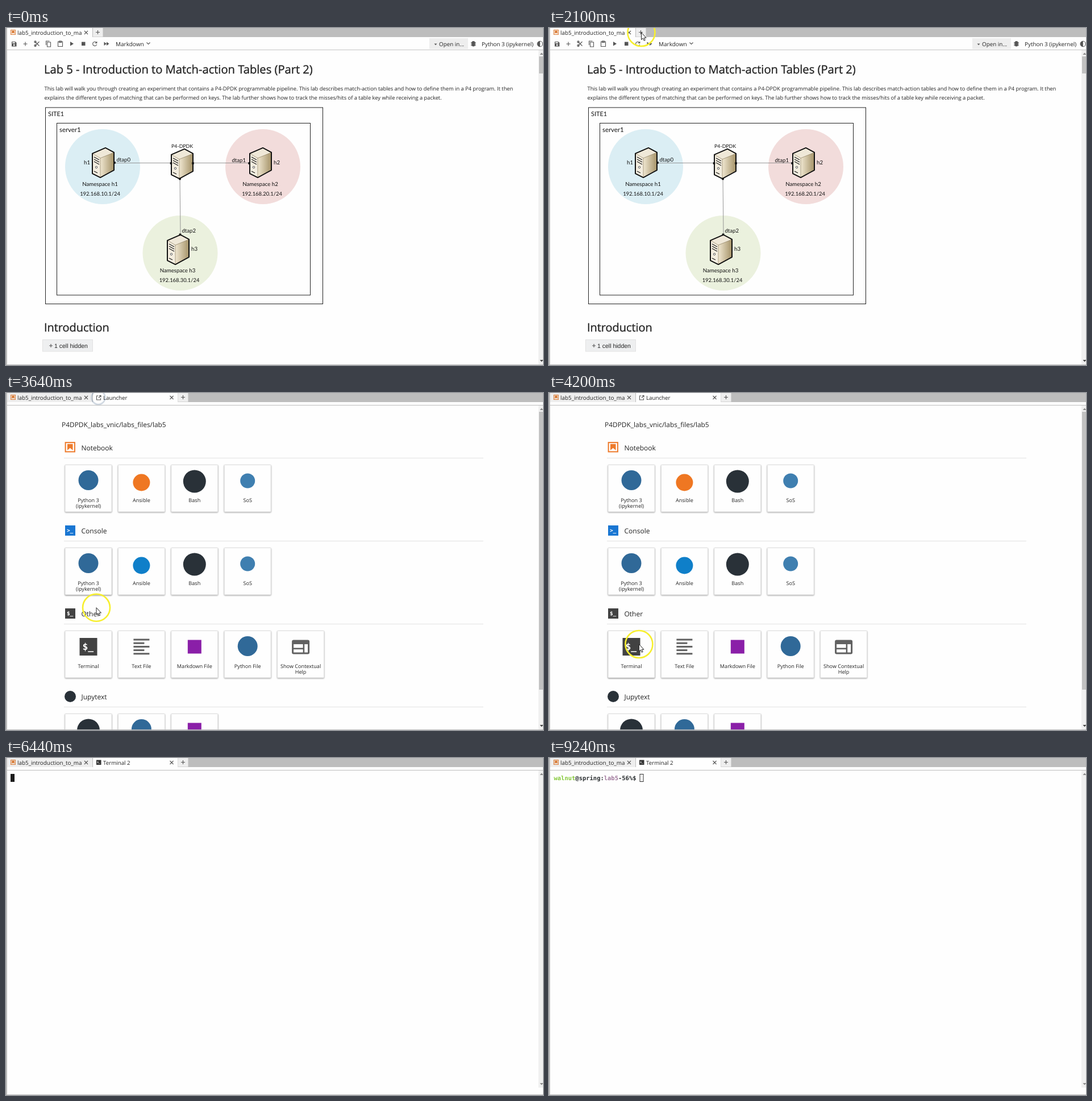
These frames come from a looping animation (945 by 593 pixels, 9310 ms). An HTML page:

```html
<!DOCTYPE html>
<html lang="en">
<head>
<meta charset="utf-8">
<title>Lab 5 walkthrough</title>
<style>
  html, body { margin: 0; width: 100%; height: 100%; overflow: hidden; background: #fefefe; }
  svg { display: block; width: 945px; height: 593px; }
  text { font-family: "Open Sans", "Noto Sans", sans-serif; fill: #242424; text-rendering: geometricPrecision; white-space: pre; }
  .lato { font-family: Lato, sans-serif; fill: #111; }
  .arial { font-family: "Liberation Sans", Arial, sans-serif; }
  .mono { font-family: "DejaVu Sans Mono", monospace; font-weight: 700; fill: #2b2f31; }
  .head { stroke: #242424; stroke-width: .35px; }
  .mid { text-anchor: middle; }
  .icon { fill: #555; }
  .line { fill: none; stroke: #555; stroke-width: 1.1; }
  .card { fill: #fefefe; stroke: #dedede; filter: drop-shadow(0 1px 1px rgba(0, 0, 0, .36)); }
  .card.hover { filter: drop-shadow(0 1px 1.2px rgba(0, 0, 0, .48)); }
  .card.focus { stroke: #3182ad; filter: drop-shadow(0 1px 2.5px rgba(0, 0, 0, .5)); }
</style>
</head>
<body>
<svg id="stage" viewBox="0 0 945 593" xmlns="http://www.w3.org/2000/svg"></svg>
<script>
const LOOP = 9310, STEP = 140;
const stage = document.getElementById('stage');

const text = (x, y, s, size, attrs = '') => `<text x="${x}" y="${y}" font-size="${size}" ${attrs}>${s}</text>`;
const rect = (x, y, w, h, fill, attrs = '') => `<rect x="${x}" y="${y}" width="${w}" height="${h}" fill="${fill}" ${attrs}/>`;
const disc = (x, y, r, fill, attrs = '') => `<circle cx="${x}" cy="${y}" r="${r}" fill="${fill}" ${attrs}/>`;
const path = (d, attrs = 'class="line"') => `<path d="${d}" ${attrs}/>`;
const at = (x, y, s) => `<g transform="translate(${x} ${y})">${s}</g>`;

// Shared window parts
const cross = x => path(`M${x - 3} 5l6 6m0-6l-6 6`);
const plus = (x, y, r) => path(`M${x - r} ${y}h${2 * r}M${x} ${y - r}v${2 * r}`);

const bookmark = (x, y, s, color) =>
  rect(x + s * .06, y + s * .06, s * .88, s * .88, 'none', `stroke="${color}" stroke-width="${s * .11}"`) +
  path(`M${x + s * .24} ${y + s * .2}h${s * .52}v${s * .6}l${-s * .26} ${-s * .22}l${-s * .26} ${s * .22}z`, `fill="${color}"`);

const prompt = (x, y, s, sign, color) => rect(x, y, s, s, color) +
  text(x + s * .16, y + s * .67, sign + '_', s * .53, 'class="mono" style="fill:#fff"');

const popOut = (x, y) => path(`M${x + 3} ${y + 1}h-3v7h7v-3M${x + 3.5} ${y + 4.5}l4-4m-3 0h3v3`);

function tabs(label, icon) {
  const end = label ? 303 : 153;
  return rect(0, 0, 945, 16, '#bdbdbd') +
    rect(2, 0, 150, 16, label ? '#eee' : '#fefefe') +
    (label ? rect(153, 0, 149.5, 16, '#fefefe') : '') +
    rect(end, 0, 17.5, 15.5, '#eee') +
    bookmark(8, 3, 9, '#d9772f') + text(20, 11.6, 'lab5_introduction_to_ma', 9.85) + cross(141) +
    (label ? icon + text(171, 11.6, label, 9.75) + cross(291.5) + rect(0, 21, 945, 1, '#bdbdbd') : '') +
    plus(end + 8.5, 7.5, 3.5);
}

const frame = rect(0, 0, 2, 593, '#bdbdbd') + rect(0, 592, 945, 1, '#bdbdbd');

function scrollbar(top, bottom, thumbY, thumbH) {
  return rect(937, top, 8, bottom - top, '#f0f0f0') +
    (thumbH ? rect(938, thumbY, 7, thumbH, '#c1c1c1') : '') +
    path(`M939.5 ${top + 8}l3-3.5l3 3.5z`, 'fill="#888"') +
    path(`M939.5 ${bottom - 8}l3 3.5l3-3.5z`, `fill="${thumbH ? '#444' : '#888'}"`);
}

// Notebook
const toolbar =
  path('M10 24h6.5l2 2v6.5h-8.5z', 'class="icon"') + rect(11.3, 25, 4.5, 2, '#fff') + disc(14.2, 30, 1.4, '#fff') +
  plus(34, 28, 3.5) +
  path('M51 24l7.5 7.5M51 31.5l7.5-7.5', 'class="line" stroke-width="1.4"') +
  disc(51.5, 24.5, 1.6, 'none', 'class="line"') + disc(51.5, 31, 1.6, 'none', 'class="line"') +
  path('M70.5 30v-7h6M72.5 25h6v8h-6z') +
  path('M91.5 24h8v8.5h-8zM93.5 23v2.5h4v-2.5z') +
  path('M113 24l6 3.8l-6 3.8zM133 24.5h6.5v6.5h-6.5z', 'class="icon"') +
  path('M159 25.5a3.6 3.6 0 1 0 .7 3.4M159.8 23.8v2.6h-2.8') +
  path('M172.5 24.5l4.5 3.2l-4.5 3.2zM177 24.5l4.5 3.2l-4.5 3.2z', 'class="icon"') +
  text(193, 31.5, 'Markdown', 10) + path('M247.5 25.5l3 3l3-3') +
  rect(745, 18, 68, 19, '#eee') + path('M753.5 27.5h5l-2.5 2.7z', 'class="icon"') +
  text(762, 31.5, 'Open in...', 9.85) +
  path('M819.5 26a3 3 0 0 1 6 0v3.5a3 3 0 0 1-6 0zM818 25h9v1h-9zM818 27.6h9v1h-9zM818 30.2h9v1h-9z', 'class="icon"') +
  text(837, 31.5, 'Python 3 (ipykernel)', 9.9) +
  disc(939.8, 28, 4.8, '#fefefe', 'stroke="#555"') + path('M939.8 23.2a4.8 4.8 0 0 0 0 9.6z', 'class="icon"') +
  rect(0, 38, 945, 1, '#c4c4c4');

const server = `
  <path d="M0 10L23 0L38 8V39L14 52L0 45Z" fill="#e9dfc9" stroke="#111" stroke-width="2" stroke-linejoin="round"/>
  <path d="M1 10.500L23 1L37 8.500L14 18Z" fill="#efe8d8"/>
  <path d="M14 18L37 8.500V38.500L14 51Z" fill="url(#tan)"/>
  <path d="M1 10.500L14 18V51L1 44.500Z" fill="#f3eddf"/>
  <path d="M14 18V51M1 10.500L14 18L37 8.500" fill="none" stroke="#8d7f60" stroke-width=".7"/>
  <path d="M3 16l9 5M3 20l9 5M3 24l9 5M3 41l6 3" stroke="#222" stroke-width="1.300"/>
  <circle cx="7" cy="34" r="1.700" fill="#fff" stroke="#333" stroke-width=".8"/>`;

const host = (x, y, n, color, label) =>
  disc(x, y, 66, color) +
  text(...label, 'h' + n, 9.7, 'class="lato"') +
  text(x - 4.5, y + 34, 'Namespace h' + n, 9.7, 'class="lato mid"') +
  text(x - 1.5 - (n === 1 ? 3 : 0), y + 51, `192.168.${n}0.1/24`, 9.4, 'class="lato mid"');

const port = (x, y) => rect(x - 1.8, y - 1.8, 3.6, 3.6, '#111');

const diagram =
  rect(69.5, 140, 488, 345.5, '#fefefe', 'stroke="#222"') +
  rect(89.5, 167.5, 446, 302.5, 'none', 'stroke="#222"') +
  host(170, 244, 1, '#dbeef4', [137, 239.5]) +
  host(452, 244, 2, '#f2dcdb', [471, 239.5]) +
  host(306.5, 396, 3, '#ebf1de', [326, 391.5]) +
  path('M191 237.500H290M329 237.500H428M306 265L307 363', 'fill="none" stroke="#8c8c8c" stroke-width=".9"') +
  [[152, 211], [291, 213], [429, 211], [284, 364]].map(([x, y]) => at(x, y, server)).join('') +
  [[191, 237], [290.5, 238], [329, 238], [428, 238], [306, 265.5], [306.5, 363.5]].map(p => port(...p)).join('') +
  [[74, 154.5, 'SITE1', 10.9], [94, 183, 'server1', 11.4], [291, 211, 'P4-DPDK', 8.8],
   [194.5, 235, 'dtap0', 9.6], [397.5, 236, 'dtap1', 9.6], [309.5, 360, 'dtap2', 9.6]]
    .map(t => text(...t, 'class="lato"')).join('');

const notebook = tabs() + toolbar +
  text(67, 80, 'Lab 5 - Introduction to Match-action Tables (Part 2)', 20.15, 'class="head"') +
  text(67.5, 110, 'This lab will walk you through creating an experiment that contains a P4-DPDK programmable pipeline. This lab describes match-action tables and how to define them in a P4 program. It then', 9.34) +
  text(67.5, 125.5, 'explains the different types of matching that can be performed on keys. The lab further shows how to track the misses/hits of a table key while receiving a packet.', 9.34) +
  diagram +
  text(67, 534, 'Introduction', 19.9, 'class="head"') +
  rect(64.5, 548.5, 88, 20.5, '#eeeff0', 'stroke="#e2e2e2"') + plus(79, 559, 3) +
  text(85, 563, '1 cell hidden', 10.5, 'class="arial"') +
  scrollbar(39, 592, 50, 30) + frame;

// Launcher
const art = {
  python: disc(41, 27, 17.5, '#306998'),
  orange: disc(41, 31, 15, '#ef7722'),
  blue: disc(41, 31, 15, '#0f7fc9'),
  bash: disc(41, 29, 20, '#293138'),
  sos: disc(41, 28, 13, '#3f7fb0'),
  terminal: prompt(25.5, 12.5, 31, '$', '#424242'),
  lines: [28, 19, 28, 19, 28].map((w, i) => rect(27, 14 + i * 6.2, w, 3, '#616161')).join(''),
  markdown: rect(29, 16, 24, 24, '#8a1fa8'),
  help: rect(27, 17.5, 28, 22, 'none', 'stroke="#616161" stroke-width="3" rx="1.500"') +
    rect(27, 17, 28, 6.5, '#616161') + rect(45, 22, 2.6, 18, '#616161') + rect(27, 30, 19, 2.6, '#616161')
};

const kernels = ansible => [['Python 3|(ipykernel)', 'python'], ['Ansible', ansible], ['Bash', 'bash'], ['SoS', 'sos']];
const sections = [
  ['Notebook', bookmark(103.5, 86, 18.5, '#ee7b2c'), kernels('orange')],
  ['Console', prompt(104, 87, 18, '&gt;', '#1976d2'), kernels('blue')],
  ['Other', prompt(104, 87, 18, '$', '#424242'),
    [['Terminal', 'terminal'], ['Text File', 'lines'], ['Markdown File', 'markdown'], ['Python File', 'python'], ['Show Contextual|Help', 'help']]],
  ['Jupytext', disc(113, 96, 10, '#293138'), [['', 'bash'], ['', 'python'], ['', 'markdown']]]
];

const card = ([label, icon], col, row) => at(104 + col * 93.4, 126.5,
  `<rect class="card" id="card${row}${col}" width="82" height="82.500" rx="1"/>` + art[icon] +
  label.split('|').map((s, i) => text(41, 65 + i * 10.5, s, 9.1, 'class="mid"')).join(''));

const launcher = tabs('Launcher', popOut(159.5, 4)) +
  text(98, 60, 'P4DPDK_labs_vnic/labs_files/lab5', 11.9) +
  sections.map(([title, icon, cards], row) => at(0, row * 146,
    icon + text(132.5, 100.5, title, 12) + rect(102, 114, 738, 1, '#e2e2e2') +
    cards.map((c, col) => card(c, col, row)).join(''))).join('') +
  scrollbar(22, 592, 33, 489) + frame;

// Terminal
const terminal = tabs('Terminal 2', prompt(159, 3.5, 8.5, '$', '#333')) +
  scrollbar(22, 580) + frame +
  '<g id="shell">' + text(8.5, 39, '<tspan fill="#86c93a">walnut</tspan>@spring:<tspan fill="#a0789c">lab5</tspan>-56%$', 10.47, 'class="mono"') + '</g>' +
  rect(8, 28, 7, 14, '#1c1c1c', 'id="block"') +
  rect(160, 28.5, 6, 13, 'none', 'id="hollow" stroke="#333"');

stage.innerHTML =
  '<defs><linearGradient id="tan"><stop stop-color="#efe6d0"/><stop offset="1" stop-color="#a8966c"/></linearGradient></defs>' +
  `<g id="notebook">${notebook}</g><g id="launcher">${launcher}</g><g id="terminal">${terminal}</g>` +
  '<circle id="ripple" fill="none" stroke-width="2.600"/>' +
  '<g id="pointer"><circle id="halo" r="24" fill="none" stroke="#f7ef2e" stroke-width="2.600"/>' +
  '<path d="M0 0V12.500L2.800 10L4.800 14.300L6.700 13.400L4.800 9.300H8.500Z" fill="#fff" stroke="#222" stroke-width="1"/></g>';

const el = id => document.getElementById(id);
const show = (id, on) => { el(id).style.display = on ? '' : 'none'; };
const progress = (t, a, b) => Math.min(1, Math.max(0, (t - a) / (b - a)));
const ease = u => u < .5 ? 4 * u ** 3 : 1 - 4 * (1 - u) ** 3;
const mix = (p, q, u) => p.map((v, i) => v + (q[i] - v) * u);

const START = [400, 320], NEW_TAB = [162.5, 8], TERMINAL = [158.4, 442];
const CLICKS = [[2660, 3850, NEW_TAB], [4480, 5040, TERMINAL]];

function drawPointer(t) {
  const pos = t < 2940
    ? mix(START, NEW_TAB, ease(progress(t, 980, 2100)))
    : mix(NEW_TAB, TERMINAL, ease(progress(t, 3080, 3920)));
  el('pointer').setAttribute('transform', `translate(${pos})`);
  el('pointer').style.opacity = progress(t, 0, 560) * (1 - progress(t, 4340, 5040));
  show('halo', t < 2660 || (t > 3080 && t < 4480));

  const click = CLICKS.find(([from, to]) => t >= from && t < to);
  show('ripple', click);
  if (!click) return;
  const [from, to, [x, y]] = click, ripple = el('ripple');
  const fade = Math.min(1, (to - t) / Math.min(800, to - from));
  ripple.setAttribute('cx', x);
  ripple.setAttribute('cy', y);
  ripple.setAttribute('r', 3.3 + (t - from) * .0089);
  ripple.style.stroke = `hsl(${205 + 27 * fade}, ${15 + 50 * fade}%, 46%)`;
  ripple.style.opacity = fade;
}

function drawShell(t) {
  const ready = t >= 8120;
  const lit = t < 5880 || (t >= 6440 && t < 7140) || (t >= 7700 && t < 8680);
  show('shell', ready);
  show('block', lit);
  el('block').setAttribute('x', ready ? 159.5 : 8);
  show('hollow', t >= 9240);
}

function draw(time) {
  const t = Math.floor(time % LOOP / STEP) * STEP;
  show('notebook', t < 2940);
  show('launcher', t >= 2940 && t < 5320);
  show('terminal', t >= 5320);
  el('card10').classList.toggle('hover', t === 3640);
  el('card20').classList.toggle('hover', t >= 3780);
  el('card20').classList.toggle('focus', t >= 4480);
  drawPointer(t);
  drawShell(t);
}

const t0 = performance.now();
function tick() {
  draw(performance.now() - t0);
  requestAnimationFrame(tick);
}
tick();
</script>
</body>
</html>
```
